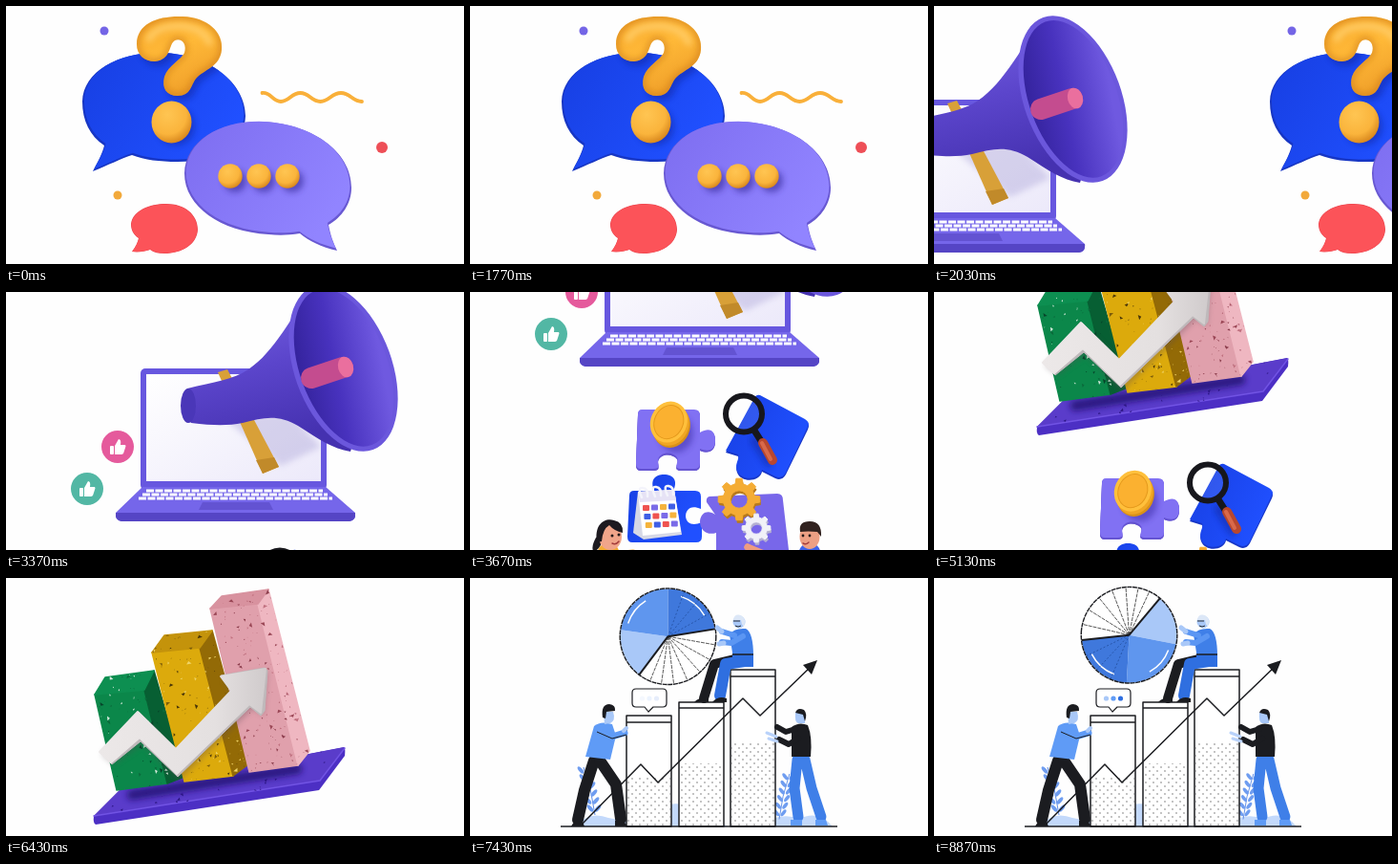
Animation, 480 px wide and 270 px high, one loop 8.91 s. Source, as an HTML page:

```html
<!DOCTYPE html>
<html lang="en">
<head>
<meta charset="utf-8">
<title>Looping slides</title>
<style>
html, body { margin: 0; width: 100%; height: 100%; overflow: hidden; background: #fefefe; }
svg.stage { display: block; width: 100vw; height: 100vh; }
.ink { fill: none; stroke: #1b1c20; stroke-width: 1.5; stroke-linejoin: round; }
.limb { fill: none; stroke-linecap: round; stroke-linejoin: round; }
</style>
</head>
<body>
<svg class="stage" viewBox="0 0 480 270">
<defs>
  <radialGradient id="gold" cx=".4" cy=".32" r=".72"><stop offset="0" stop-color="#ffc552"/><stop offset=".65" stop-color="#fab43c"/><stop offset="1" stop-color="#d5831a"/></radialGradient>
  <linearGradient id="amber" x2=".5" y2="1"><stop offset="0" stop-color="#f7a92e"/><stop offset=".5" stop-color="#ffb938"/><stop offset="1" stop-color="#f0a02a"/></linearGradient>
  <linearGradient id="blue" x2="1" y2=".5"><stop offset="0" stop-color="#173fe2"/><stop offset="1" stop-color="#2050ff"/></linearGradient>
  <linearGradient id="violet" x2="1" y2=".5"><stop offset="0" stop-color="#7d6df0"/><stop offset="1" stop-color="#9184ff"/></linearGradient>
  <linearGradient id="cone" x2=".3" y2="1"><stop offset="0" stop-color="#7d69ea"/><stop offset=".55" stop-color="#5b45cb"/><stop offset="1" stop-color="#4531b0"/></linearGradient>
  <linearGradient id="bell" x2="1" y2=".3"><stop offset="0" stop-color="#2f1f94"/><stop offset=".5" stop-color="#4832be"/><stop offset="1" stop-color="#6f59e0"/></linearGradient>
  <linearGradient id="screen" y2="1" x2="1"><stop offset="0" stop-color="#fff"/><stop offset="1" stop-color="#ece9fa"/></linearGradient>
  <linearGradient id="chalk" x2="1"><stop offset="0" stop-color="#ece8e8"/><stop offset=".7" stop-color="#e4e0e0"/><stop offset="1" stop-color="#d0cbcc"/></linearGradient>
  <filter id="soft" x="-50%" y="-50%" width="200%" height="200%"><feGaussianBlur stdDeviation="3"/></filter>
  <pattern id="dots" width="8" height="8" patternUnits="userSpaceOnUse"><circle cx="2" cy="2" r=".65" fill="#555"/><circle cx="6" cy="6" r=".65" fill="#555"/></pattern>
  <path id="blueShape" d="M91 173C96 163 101 155 103 146C88 136 80 120 80 100C81 68 118 49 158 49C215 49 251 82 251 115C250 145 222 163 180 163C160 163 146 161 132 156C120 160 108 166 91 173Z"/>
  <path id="violetShape" d="M347 256C330 252 318 246 308 238C296 240 285 240 275 239C225 236 187 210 187 175C188 142 222 121 265 121C320 122 362 152 362 190C362 207 352 221 338 229C340 240 343 248 347 256Z"/>
  <path id="redShape" d="M132 257C136 252 138 247 139 243C133 239 131 234 131 228C133 214 150 207 168 207C187 207 201 218 201 234C200 250 184 259 166 259C160 259 155 258 151 255C145 257 138 258 132 257Z"/>
  <path id="mark" d="M137 40C137 18 160 10 185 11C212 12 228 28 226 46C224 64 208 66 199 76C194 82 194 94 180 94C168 94 163 86 166 74C170 62 184 56 187 49C190 40 184 33 177 36C170 40 174 56 156 58C145 58 137 51 137 40Z"/>
  <g id="thumb" fill="#fff"><rect x="-8" y="-1" width="4" height="9" rx="1"/><path d="M-3 -1L1 -8Q4 -8 3 -2H8Q9 -1 8 1L6 7Q5 8 4 8H-3Z"/></g>
  <g id="plant" fill="#6f9df0"><path d="M0 50Q-3 25 -12 0" fill="none" stroke="#5c8be6"/></g>
  <clipPath id="inBlue"><use href="#blueShape"/></clipPath>
  <clipPath id="inMark"><use href="#mark"/></clipPath>
</defs>

<!-- speech bubbles -->
<g id="talk">
  <circle cx="103" cy="26" r="4.5" fill="#7465e6"/>
  <circle cx="117" cy="198" r="4.5" fill="#f2a93b"/>
  <circle cx="394" cy="148" r="6" fill="#ee4f57"/>
  <use href="#blueShape" fill="#1736c4"/>
  <use href="#blueShape" fill="url(#blue)" transform="translate(3.5 .8) scale(.98)"/>
  <g clip-path="url(#inBlue)"><g filter="url(#soft)" opacity=".4" fill="#0a1f8c">
    <use href="#mark" transform="translate(4 5)"/>
    <circle cx="178" cy="126" r="20"/>
  </g></g>
  <use href="#mark" fill="url(#amber)"/>
  <g clip-path="url(#inMark)">
    <use href="#mark" fill="none" stroke="#c87412" stroke-width="6" opacity=".55" filter="url(#soft)"/>
    <path class="limb" d="M150 34Q158 20 184 21Q208 24 213 38" stroke="#ffcb63" stroke-width="7" filter="url(#soft)"/>
  </g>
  <ellipse cx="173.500" cy="121.500" rx="21" ry="22" fill="url(#gold)"/>
  <use href="#violetShape" fill="#6858d2"/>
  <use href="#violetShape" fill="url(#violet)" transform="translate(5 2) scale(.982)"/>
  <g id="beads"></g>
  <use href="#redShape" fill="#e8424b"/>
  <use href="#redShape" fill="#fc5359" transform="translate(2.500 3.500) scale(.985)"/>
  <path class="limb" d="M268.500 91C278 90 279 100 288 100S299 91 308.500 91S320 100 329.500 100S341 91 351 91S363 100 373 100" stroke="#f9b03a" stroke-width="3.800"/>
</g>

<!-- laptop and megaphone -->
<g id="shout">
  <rect x="141" y="98" width="195" height="127" rx="5" fill="#6757df"/>
  <rect x="147" y="104" width="183" height="112" fill="url(#screen)"/>
  <path d="M143 222H335L366 249Q367 257 360 258H121Q114 257 115 249Z" fill="#7566ea"/>
  <path d="M115 249H366Q367 257 360 258H121Q114 257 115 249Z" fill="#5545c5"/>
  <g stroke="#fff" stroke-width="3" stroke-dasharray="8 1.500">
    <path d="M147 226H332M143 230H337M139 234H342"/>
  </g>
  <path d="M206 238H276L280 246H202Z" fill="#6353d2"/>
  <circle cx="85" cy="224" r="17" fill="#52b7a4"/>
  <circle cx="117" cy="180" r="17" fill="#e55a9c"/>
  <use href="#thumb" x="85" y="224"/><use href="#thumb" x="117" y="180"/>
  <g transform="translate(208 0)">
    <path d="M20 150L70 125L122 180L80 200Z" fill="#9d95d0" opacity=".35" filter="url(#soft)"/>
    <path d="M14 102L24 99L78 201L61 208Z" fill="#d8a038"/>
    <path d="M61 208L78 201L73 191L54 194Z" fill="#c18a2a"/>
    <path d="M115 14C94 37 75 80 46 99C30 110 10 112 -18 119Q-30 138 -14 155C10 158 25 158 40 155C62 149 78 146 98 158C120 172 134 182 153 185L180 100Z" fill="url(#cone)"/>
    <ellipse cx="-17" cy="137" rx="8" ry="18" fill="#4a37b8"/>
    <g transform="rotate(-20 145.500 97.500)">
      <ellipse cx="145.500" cy="97.500" rx="51" ry="91" fill="#6b57dc"/>
      <ellipse cx="146" cy="97.500" rx="46" ry="86" fill="url(#bell)"/>
    </g>
    <path class="limb" d="M112 108L145 97" stroke="#c44c8f" stroke-width="22"/>
    <ellipse cx="148" cy="96.500" rx="8" ry="11" fill="#ea6f9e" transform="rotate(-15 148 96.500)"/>
  </g>
</g>

<!-- puzzle team -->
<g id="puzzle">
  <path id="plumPiece" d="M180 34H235Q241 34 241 40V58C252 52 257 57 257 66C257 76 251 80 241 76V91Q241 97 235 97H222C211 97 220 90 217 85C212 78 198 79 197 88C197 93 200 97 192 97H179Q174 97 174 91L176 39Q176 34 180 34Z" fill="#6554d2"/>
  <use href="#plumPiece" style="fill:none"/>
  <path d="M180 33H235Q241 33 241 39V57C252 51 257 56 257 65C257 75 251 78 241 74V89Q241 95 235 95H222C211 95 220 88 217 83C212 76 198 77 197 86C197 91 200 95 192 95H179Q174 95 174 89L176 38Q176 33 180 33Z" fill="#8171f3"/>
  <ellipse cx="216" cy="58" rx="18" ry="20" fill="#33249a" opacity=".45" filter="url(#soft)"/>
  <g transform="rotate(25 209 47)">
    <ellipse cx="213" cy="50" rx="19" ry="22" fill="#d99118"/>
    <ellipse cx="211" cy="48.500" rx="19" ry="22" fill="#f0a624"/>
    <ellipse cx="208" cy="46.500" rx="19" ry="22" fill="#ffc03c"/>
    <ellipse cx="208" cy="46.500" rx="15" ry="18" fill="#fbb130" stroke="#e59a1c"/>
  </g>
  <path d="M304 19L351 44Q357 48 354 54L331 101Q327 108 320 105L306 98C304 109 284 110 280 99C277 91 283 87 281 82L268 78L298 22Q300 18 304 19Z" fill="#1736c8"/>
  <path d="M304 18L351 43Q357 47 354 51L331 99Q327 106 320 103L306 96C304 107 284 108 280 97C277 89 283 85 281 80L268 76L298 21Q300 17 304 18Z" fill="url(#blue)"/>
  <path class="limb" d="M303 62L318 86" stroke="#0b1c80" stroke-width="9" opacity=".4" filter="url(#soft)" transform="translate(-5 3)"/>
  <circle cx="287" cy="37.500" r="19" fill="#fff" fill-opacity=".1" stroke="#17171c" stroke-width="6"/>
  <g class="limb"><path d="M298 55L305 66" stroke="#17171c" stroke-width="7"/><path d="M307 68L317 86" stroke="#b8472e" stroke-width="10"/><path d="M306 68L315 85" stroke="#d9694a" stroke-width="4"/></g>
  <path d="M172 118H193C188 106 195 101 203 101C214 101 218 108 213 118H236Q242 118 242 124V137C231 132 226 138 226 145C227 153 234 155 243 151V166Q243 172 237 172H170Q165 172 165 166L167 123Q167 118 172 118Z" fill="url(#blue)"/>
  <path d="M251 124L322 121Q328 121 328 128L334 180Q334 186 328 186H262Q257 186 258 180V162C249 165 241 160 241 150C242 140 250 138 257 143L248 130Q247 125 251 124Z" fill="#7867ea"/>
  <path d="M176 119L214 117L222 164L182 169L171 162Z" fill="#d6d8e6"/>
  <path d="M176 119L214 117L221 161L181 165Z" fill="#fff"/>
  <path d="M176 119L214 117L216 128L178 130Z" fill="#e6e2f5"/>
  <g id="days"></g>
  <g class="limb" stroke="#f4f4fb" stroke-width="2.500"><path d="M180 125Q175 114 181 115T186 124M194 124Q189 113 195 114T200 123M207 123Q202 112 208 113T213 122"/></g>
  <g id="gears" fill-rule="evenodd"></g>
  <g class="limb">
    <path d="M140 220L132 258M148 220L156 258" stroke="#2b48c9" stroke-width="11"/>
    <path d="M145 184V214" stroke="#f4ad35" stroke-width="23"/>
    <path d="M152 186L171 184" stroke="#f4ad35" stroke-width="9"/>
    <path d="M127 262H136M154 262H163" stroke="#f0525a" stroke-width="6"/>
    <path d="M353 220L345 258M362 220L367 258" stroke="#343452" stroke-width="11"/>
    <path d="M356 184V214" stroke="#3e63ea" stroke-width="23"/>
    <path d="M350 185L318 188" stroke="#3e63ea" stroke-width="9"/>
    <path d="M318 188L291 177" stroke="#ee9c80" stroke-width="7"/>
    <path d="M338 262H346M362 262H369" stroke="#f4ad35" stroke-width="6"/>
  </g>
  <path d="M132 167Q126 178 130 182Q140 176 138 165Z" fill="#1d1a20"/>
  <ellipse cx="147" cy="166" rx="12" ry="14" fill="#f0a58a"/>
  <path d="M133 172C130 153 141 146 151 149Q161 151 160 162Q151 160 146 154Q139 158 138 171Z" fill="#1d1a20"/>
  <ellipse cx="356" cy="166" rx="10.500" ry="13" fill="#eda084"/>
  <path d="M346 161Q344 150 356 150Q369 150 368 166L364 161Q354 160 346 161Z" fill="#31221f"/>
  <g fill="#241a1a"><circle cx="149" cy="165" r="1.500"/><circle cx="156" cy="164" r="1.500"/><circle cx="349" cy="165" r="1.400"/><circle cx="356" cy="165" r="1.400"/></g>
  <path class="limb" d="M149 173Q153 175 156 171M349 173Q352 175 355 172" stroke="#a33c3c" stroke-width="1.500"/>
</g>

<!-- terrazzo chart -->
<g id="chart"><g transform="translate(16 0)">
  <path d="M92 249L119 222L354 177Q356 178 355 186L328 222L94 258Q91 257 92 249Z" fill="#4c2fc4"/>
  <path id="slab" d="M92 249L119 222L355 177L329 212Z" fill="#5a3cca"/>
  <path d="M92 249L329 212L355 178" class="limb" stroke="#7153e4" stroke-width="1.500"/>
  <path class="limb" d="M132 227L305 200" stroke="#1f0d6b" stroke-width="11" opacity=".75" filter="url(#soft)"/>
  <g id="bars"></g>
  <path d="M100 184L141 144L180 183L238 122L228 106L274 97L270 144L259 136L181 212L143 173L113 195Z" fill="#5a4a52" opacity=".35" filter="url(#soft)"/>
  <path d="M98 182L139 140L178 179L236 118L225 102L271 94L274 97L271 139L267 144L256 135L180 208L141 171L111 195Z" fill="#bfb9bb" stroke="#bfb9bb" stroke-linejoin="round"/>
  <path d="M98 182L138 140L178 179L236 118L225 103L272 95L267 141L255 132L179 205L140 167L110 193Z" fill="url(#chalk)" stroke="url(#chalk)" stroke-width="2" stroke-linejoin="round"/>
</g></g>

<!-- line-art office -->
<g id="office">
  <path d="M110 260Q125 243 145 251Q165 256 190 245Q215 228 240 244L270 260ZM300 260Q325 244 345 252Q365 242 380 260Z" fill="#c3d9fb"/>
  <use href="#plant" x="131" y="198"/><use href="#plant" transform="translate(324 205) scale(-.9 .95)"/>
  <g id="columns" class="ink"></g>
  <path class="ink" d="M95 260H385"/>
  <path class="ink" d="M117 258L179 195L197 214L286 126L304 144L358 92"/>
  <path d="M364 86L358 101L349 91Z" fill="#1b1c20"/>
  <path class="ink" d="M174 116H202Q206 116 206 120V131Q206 135 202 135H192L187 140L183 135H174Q170 135 170 131V120Q170 116 174 116Z" style="fill:#fff;stroke-width:1.200"/>
  <g id="typing"></g>
  <g id="pie"></g>

  <g class="limb">
    <path d="M277 85L256 90L245 126" stroke="#1b1c20" stroke-width="10"/>
    <path d="M288 87L268 90L262 123" stroke="#2f6fe0" stroke-width="12"/>
  </g>
  <path d="M235 130Q240 124 250 126V130ZM254 130Q260 123 269 126V130Z" fill="#1b1c20"/>
  <path d="M272 59Q277 52 289 53Q297 57 297 82V93H275V78Z" fill="#3f7fe8"/>
  <path d="M275 80H297V93H275Z" fill="#2f6fe0"/>
  <path class="ink" d="M275 80H297"/>
  <g id="elder">
    <path class="limb" d="M286 61L274 68L264 67M277 60L264 56" stroke="#5b96f3" stroke-width="6"/>
    <path class="limb" d="M266 68L261 69M264 56L259 52" stroke="#a9c8f8" stroke-width="5"/>
    <circle cx="282" cy="46" r="6.500" fill="#a9c8f8"/>
    <path d="M276 44Q277 37 284 39Q290 42 287 51Q284 48 284 44Z" fill="#dce7f7"/>
    <path class="ink" d="M276 45H283M278 50Q281 52 284 50" style="stroke-width:.900"/>
  </g>

  <g class="limb" stroke="#1b1c20" stroke-width="12">
    <path d="M130 191L120 222L113 253"/><path d="M136 191L153 216L158 252"/>
  </g>
  <path d="M106 260Q108 254 118 255L120 260ZM152 260V254H161L165 260Z" fill="#1b1c20"/>
  <path d="M130 155Q137 149 149 153L153 165L147 190L121 187Z" fill="#5f9bf6"/>
  <g id="pusher">
    <path class="limb" d="M134 160L149 166L162 162" stroke="#5f9bf6" stroke-width="7"/>
    <path class="ink" d="M133 161L149 168L164 164" style="stroke-width:1"/>
    <path class="limb" d="M161 160L164 157" stroke="#a9c8f8" stroke-width="4"/>
    <path d="M140 140H150Q153 149 147 152L141 153Z" fill="#a9c8f8"/>
    <path d="M139 146Q137 132 146 132Q153 133 152 139L143 140L142 147Z" fill="#1b1c20"/>
  </g>

  <g class="limb" stroke="#3f7fe8" stroke-width="11"><path d="M343 190L340 220L344 250M351 190L358 220L368 250"/></g>
  <path d="M336 253H348V259H336ZM362 253H373L375 259H362Z" fill="#5f9bf6"/>
  <path d="M337 156Q345 150 354 154Q359 166 357 187H337Z" fill="#1b1c20"/>
  <g id="holder">
    <path class="limb" d="M341 158L331 161L322 156M344 168L334 174L324 169" stroke="#1b1c20" stroke-width="6"/>
    <path class="limb" d="M321 166L311 162M322 171L313 168" stroke="#b9d2fa" stroke-width="3"/>
    <path d="M341 141H351V152H344Q340 151 341 141Z" fill="#a9c8f8"/>
    <path d="M341 141Q343 135 350 138Q354 142 351 150L349 143Z" fill="#1b1c20"/>
  </g>
</g>
</svg>

<script>
const LOOP = 8910, FRAME = 1000 / 30, SLIDE = 500;
const $ = id => document.getElementById(id);
const add = (id, markup) => $(id).insertAdjacentHTML('beforeend', markup);
const polar = (r, deg) => {
  const a = deg * Math.PI / 180;
  return (r * Math.cos(a)).toFixed(2) + ' ' + (r * Math.sin(a)).toFixed(2);
};
let seed = 7;
const random = () => (seed = seed * 16807 % 2147483647) / 2147483647;

for (const x of [235, 265, 295])
  add('beads', `<circle cx="${x + 5}" cy="183" r="12" fill="#2f2290" opacity=".55" filter="url(#soft)"/>
    <circle cx="${x}" cy="178" r="12.700" fill="url(#gold)"/>`);

const dayColors = ['#ef5350', '#3f5fe6', '#f5b33c', '#7a6be8'];
for (let i = 0; i < 12; i++) {
  const col = i % 4, row = i / 4 | 0;
  add('days', `<rect x="${181 + col * 9 + row * 1.4}" y="${133 + row * 9 - col * .5}" width="7" height="6" rx="1" fill="${dayColors[(i * 3 + row) % 4]}"/>`);
}

function gear(x, y, r, teeth, fill, shade) {
  const step = 360 / teeth;
  let d = '';
  for (let i = 0; i < teeth; i++)
    [[.76, -.3], [1, -.18], [1, .18], [.76, .3]].forEach(([k, a]) =>
      d += (d ? 'L' : 'M') + polar(r * k, (i + a) * step));
  const hole = r * .42;
  d += `ZM${hole} 0A${hole} ${hole} 0 1 0 ${-hole} 0A${hole} ${hole} 0 1 0 ${hole} 0Z`;
  add('gears', `<path d="${d}" fill="${shade}" transform="translate(${x + 1} ${y + 3})"/>
    <path d="${d}" fill="${fill}" stroke="${fill}" stroke-linejoin="round" transform="translate(${x} ${y})"/>`);
}
gear(282, 127, 22, 8, '#f4ac34', '#b87a1c');
gear(300, 157, 15, 8, '#f1f1f8', '#b4b0d2');
add('gears', '<path class="limb" d="M300 184L291 177" stroke="#ee9c80" stroke-width="7"/>');

// Speckled stone, scattered inside a clip outline
function specks(outline, x, y, w, h, count, colors) {
  const id = 'clip' + seed;
  let s = '';
  for (let i = 0; i < count; i++) {
    const r = .6 + random() ** 3 * 2.4;
    const a = random() * 360;
    const place = `${x + random() * w} ${y + random() * h}`;
    s += `<path d="M${polar(r, a)}L${polar(r * .8, a + 100)}L${polar(r, a + 210)}Z" fill="${colors[i % colors.length]}" transform="translate(${place})"/>`;
  }
  add('bars', `<clipPath id="${id}"><path d="${outline}"/></clipPath><g clip-path="url(#${id})">${s}</g>`);
}

// Corners: front-left, back-left, back-right, front-right, then the foot points
function bar([a, b, c, d, e, f, g], [front, top, side], colors) {
  const face = (pts, fill) => add('bars', `<path d="M${pts.join('L')}Z" fill="${fill}" stroke="${fill}" stroke-width="1.500" stroke-linejoin="round"/>`);
  face([a, d, f, e], front);
  face([d, c, g, f], side);
  face([a, b, c, d], top);
  const [x0, y0] = a.split(' ').map(Number), [x1] = g.split(' ').map(Number);
  const [, y1] = e.split(' ').map(Number);
  specks(`M${[a, b, c, g, f, e].join('L')}Z`, x0, y0 - 22, x1 - x0, y1 - y0 + 22, (y1 - y0) * 1.4, colors);
}
specks($('slab').getAttribute('d'), 92, 177, 263, 80, 90, ['#2c1684']);
bar(['93 122', '104 104', '155 97', '145 117', '116 222', '169 215', '187 208'],
  ['#0b874a', '#0d8f51', '#075f33'], ['#d5eadb', '#06452a', '#0a6a3b']);
bar(['153 78', '166 60', '216 55', '203 73', '187 213', '238 207', '254 195'],
  ['#dcaa0c', '#c4930b', '#936a06'], ['#4a3608', '#7d5d0a', '#f0d468']);
bar(['214 32', '226 19', '275 12', '264 27', '255 203', '306 196', '318 181'],
  ['#e0a0ac', '#d8929f', '#efb7c1'], ['#9a4655', '#c0707f', '#8b3c4b']);

for (let i = 0; i < 6; i++)
  for (const side of [-1, 1])
    add('plant', `<ellipse cx="${-11 + i * 2 + side * 4}" cy="${3 + i * 8}" rx="2" ry="4.500" transform="rotate(${side * 40} ${-11 + i * 2 + side * 4} ${3 + i * 8})"/>`);

for (const [x, y, strip, dotted] of [[164, 144, 151, 207], [219, 130, 136, 194], [273, 96, 103, 173]])
  add('columns', `<rect x="${x}" y="${y}" width="47" height="${260 - y}" fill="#fff"/>
    <rect x="${x + 1}" y="${dotted}" width="45" height="${259 - dotted}" fill="url(#dots)" stroke="none"/>
    <path d="M${x} ${strip}h47"/>`);

['#a9c8f8', '#5f9bf6', '#2f6fe0'].forEach((c, i) =>
  add('typing', `<circle cx="${180.5 + i * 7.5}" cy="126" r="2.600" fill="${c}"/>`));

// Angles as they stand when the pie is at zero turn
const wedge = (from, to, fill) =>
  `<path d="M0 0L${polar(50, from)}A50 50 0 ${to - from > 180 ? 1 : 0} 1 ${polar(50, to)}Z" fill="${fill}"/>`;
const arc = (from, to) =>
  `<path d="M${polar(44, from)}A44 44 0 0 1 ${polar(44, to)}" fill="none" stroke="#fff" stroke-width="1.500"/>`;
let pie = '<circle r="50" fill="#fff"/>' + wedge(127, 188, '#a9c8f8') + wedge(188, 270, '#5f96ee')
  + wedge(270, 351, '#3f78dc') + arc(198, 238) + arc(288, 330);
for (const a of [10, 29, 48, 66, 83, 98, 112])
  pie += `<path d="M0 0L${polar(50, a)}" stroke="#333" stroke-width=".800" stroke-dasharray="4 1"/>`;
for (const a of [290, 310, 331])
  pie += `<path d="M0 0L${polar(50, a)}" stroke="#234f9f" stroke-width=".800" stroke-dasharray="2 2"/>`;
for (const a of [127, 351])
  pie += `<path d="M0 0L${polar(50, a)}" stroke="#1b1c20" stroke-width="2"/>`;
pie += '<circle r="50.300" fill="none" stroke="#1b1c20" stroke-width="1.400" stroke-dasharray="5 .700"/>';
add('pie', `<g transform="translate(1.500 .700)">${pie}</g>`);

const clamp = v => Math.min(1, Math.max(0, v));
const move = (id, x, y) => $(id).setAttribute('transform', `translate(${x} ${y})`);

function draw(now) {
  const t = Math.floor((now % LOOP + 5) / FRAME) * FRAME;
  const [p1, p2, p3, p4] = [1750, 3333.3, 4833.3, 6416.7].map(start => clamp((t - start) / SLIDE));
  move('talk', 480 * p1, 0);
  move('shout', 480 * (p1 - 1), -270 * p2);
  move('puzzle', 0, 270 * (1 - p2 + p3));
  move('chart', -480 * p4, 270 * (p3 - 1));
  move('office', 480 * (1 - p4), 0);

  const turn = 183 * (t - 7433.3) / 1433.4;
  $('pie').setAttribute('transform', `translate(206 60.500) rotate(${turn})`);
  const sway = Math.sin((t - 7433.3) / 1433.4 * Math.PI * 2);
  move('elder', 0, sway * .7);
  move('pusher', sway * .5, 0);
  move('holder', 0, -sway);
  [...$('typing').children].forEach((dot, i) =>
    dot.setAttribute('opacity', .12 + .88 * clamp((t - 8000 - i * 170) / 250)));
}
function loop() {
  draw(performance.now());
  requestAnimationFrame(loop);
}
loop();
</script>
</body>
</html>
```
